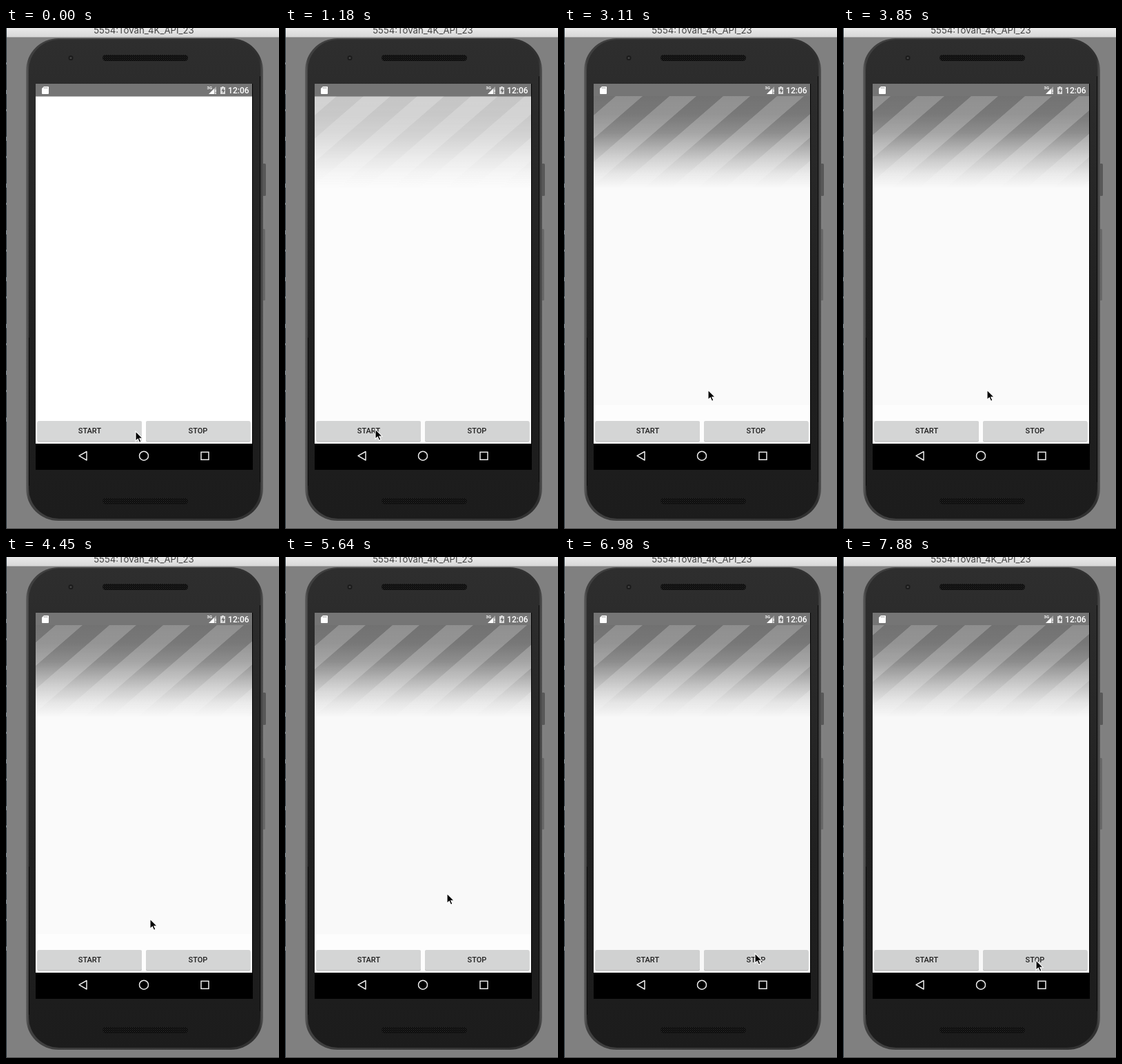
An HTML page that plays this animation: 396 by 728 pixels, repeating every 8000 ms.

```html
<!DOCTYPE html>
<html lang="en">
<head>
<meta charset="utf-8">
<title>Emulator stripes</title>
<style>
  html, body { margin: 0; width: 100%; height: 100%; overflow: hidden; background: #808080; }
  svg { display: block; width: 396px; height: 728px; }
  text { font-family: Roboto, "Open Sans", sans-serif; }
  .title { font: 13.2px Inter, "Open Sans", sans-serif; fill: #444; }
  .label { font-size: 11px; font-weight: 500; fill: #202020; }

  /* 54 held pictures of about 148 ms; percentages are picture / 54 */
  .move { animation: 8s -15ms infinite; }
  .panel { animation-name: panel; }
  .stripes { animation-name: stripes; animation-timing-function: steps(54); }
  .tint { animation-name: tint; }
  .tint-top { animation-name: tint-top; }
  .cursor { animation-name: cursor; }

  @keyframes panel {
    0%, 11.111% { opacity: 0; animation-timing-function: steps(5); }
    20.37%, 100% { opacity: 1; }
  }
  /* 9px to the left per picture */
  @keyframes stripes {
    from { transform: translateX(0); }
    to { transform: translateX(-486px); }
  }
  @keyframes tint {
    0%, 11.111% { opacity: 0; animation-timing-function: steps(5); }
    20.37%, 25.926% { opacity: .031; animation-timing-function: steps(6); }
    37.037%, 70.37% { opacity: .008; animation-timing-function: steps(8); }
    85.185%, 100% { opacity: .027; }
  }
  @keyframes tint-top {
    0%, 25.926% { opacity: 0; animation-timing-function: steps(6); }
    37.037%, 55.556% { opacity: .01; animation-timing-function: steps(8); }
    70.37% { opacity: .016; animation-timing-function: steps(8); }
    85.185%, 100% { opacity: 0; }
  }
  @keyframes cursor {
    0% { transform: translate(188px, 586px); animation-timing-function: steps(4); }
    7.4074%, 25.926% { transform: translate(131px, 583px); animation-timing-function: steps(6); }
    37.037%, 55.556% { transform: translate(209px, 526px); animation-timing-function: steps(7); }
    68.518%, 70.37% { transform: translate(235px, 489px); animation-timing-function: steps(8); }
    85.185% { transform: translate(277px, 572px); animation-timing-function: steps(1); }
    87.037% { transform: translate(277px, 576px); animation-timing-function: steps(3); }
    92.593%, 100% { transform: translate(280px, 586px); }
  }
</style>
</head>
<body>
<svg viewBox="0 0 396 728">
  <defs>
    <linearGradient id="bar" x2="0" y2="1">
      <stop stop-color="#eaeaea"/><stop offset="1" stop-color="#d8d8d8"/>
    </linearGradient>
    <linearGradient id="rim">
      <stop stop-color="#626262"/><stop offset=".012" stop-color="#404040"/>
      <stop offset=".985" stop-color="#303030"/><stop offset="1" stop-color="#555"/>
    </linearGradient>
    <linearGradient id="body" x2="0" y2="1">
      <stop stop-color="#2e2e2e"/><stop offset=".25" stop-color="#282828"/>
      <stop offset=".6" stop-color="#202020"/><stop offset="1" stop-color="#1c1c1c"/>
    </linearGradient>
    <linearGradient id="fade" gradientUnits="userSpaceOnUse" x1="0" y1="99" x2="0" y2="232">
      <stop stop-color="#747474"/>
      <stop offset=".2" stop-color="#747474" stop-opacity=".95"/>
      <stop offset=".4" stop-color="#747474" stop-opacity=".79"/>
      <stop offset=".55" stop-color="#747474" stop-opacity=".57"/>
      <stop offset=".7" stop-color="#747474" stop-opacity=".34"/>
      <stop offset=".85" stop-color="#747474" stop-opacity=".14"/>
      <stop offset="1" stop-color="#747474" stop-opacity=".01"/>
    </linearGradient>
    <pattern id="stripe" width="78" height="140" patternUnits="userSpaceOnUse"
             patternTransform="translate(30 99) skewX(-49)">
      <rect width="39" height="140" fill="#fff" fill-opacity=".22"/>
    </pattern>
    <pattern id="mesh" width="3" height="3" patternUnits="userSpaceOnUse">
      <rect width="3" height="3" fill="#0c0c0c"/>
      <path d="M0 0h1v1h-1zM1.5 1.5h1v1h-1z" fill="#303030"/>
    </pattern>
    <clipPath id="view"><rect x="43" y="99" width="314" height="505"/></clipPath>
    <g id="button">
      <rect y="1" width="151.500" height="29.500" rx="2" fill="#c4c4c4"/>
      <rect width="151.500" height="29" rx="2" fill="#d6d7d7"/>
    </g>
    <rect id="grille" x="140" width="124" height="9" rx="4.5" fill="url(#mesh)"/>
  </defs>

  <!-- window -->
  <rect width="396" height="728" fill="#808080"/>
  <rect width="396" height="13" fill="url(#bar)"/>
  <path d="M0 13.5H396" stroke="#a0a0a0"/>
  <path d="M.5 0V728" stroke="#27343c"/>
  <path d="M.5 50V590" stroke="#75838b" stroke-dasharray="3 37 6 22"/>
  <path d="M0 727.5H396" stroke="#484848"/>
  <text class="title" x="200" y="8" text-anchor="middle">5554:Tovan_4K_API_23</text>

  <!-- phone -->
  <rect x="372" y="197" width="5" height="47" rx="1.5" fill="#585858"/>
  <rect x="372" y="292" width="4" height="104" rx="1.5" fill="#686868"/>
  <rect x="29" y="15" width="344" height="701" rx="47" fill="url(#rim)"/>
  <rect x="33" y="17" width="336" height="696" rx="44" fill="url(#body)"/>
  <path d="M33.500 450V665M368.500 70V660" stroke="#0c0c0c"/>
  <circle cx="94" cy="43.500" r="3.500" fill="#1b1b1b"/>
  <circle cx="94" cy="43.500" r="1.500" fill="#444"/>
  <use href="#grille" y="39"/>
  <use href="#grille" y="683"/>

  <!-- screen -->
  <rect x="43" y="81" width="315" height="561"/>
  <rect x="43" y="99" width="314" height="505" fill="#fff"/>
  <rect x="43" y="81" width="314" height="18.500" fill="#757575"/>
  <g fill="#fff">
    <path d="M55 85h6q1 0 1 1v9q0 1-1 1h-8q-1 0-1-1v-7z"/>
    <path d="M55.500 86v2M57.500 86v2M59.500 86v2" stroke="#858585" stroke-width=".8"/>
    <text x="291.500" y="89" font-size="6" font-weight="700">3G</text>
    <path d="M294 96L302 88v8z"/>
    <path d="M302 88l3-3v11h-3z" opacity=".4"/>
    <path d="M303.500 89.500h1.200v3.500h-1.200zM303.500 94.500h1.200v1.500h-1.200z"/>
    <path d="M313 85h3v1h2v10h-7v-10h2z" opacity=".75"/>
    <path d="M315.500 87l-3 4.500h2v3.500l3-4.800h-2z" fill="#666"/>
    <text x="337.300" y="95" font-size="12" font-weight="500" text-anchor="middle">12:06</text>
  </g>

  <g clip-path="url(#view)">
    <g class="move panel">
      <rect x="43" y="99" width="314" height="133" fill="url(#fade)"/>
      <rect class="move stripes" x="43" y="99" width="810" height="133" fill="url(#stripe)"/>
    </g>
    <use href="#button" x="45.500" y="571"/>
    <use href="#button" x="203" y="571"/>
    <rect class="move tint" x="43" y="99" width="314" height="505"/>
    <rect class="move tint-top" x="43" y="99" width="314" height="449"/>
  </g>
  <text class="label" x="121.500" y="589" text-anchor="middle">START</text>
  <text class="label" x="278.500" y="589" text-anchor="middle">STOP</text>

  <g fill="none" stroke="#ececec" stroke-width="1.5">
    <path d="M117 615.500V628L106 621.700z" stroke-linejoin="round"/>
    <circle cx="200" cy="621.700" r="6.500"/>
    <rect x="283" y="616.300" width="11" height="11"/>
  </g>

  <g class="move cursor">
    <path d="M0 0V14.200L3.300 11.100L5.500 16.300L8 15.200L5.800 10.200H10z" stroke="#fff" stroke-width="1.100"/>
  </g>
</svg>
</body>
</html>
```
